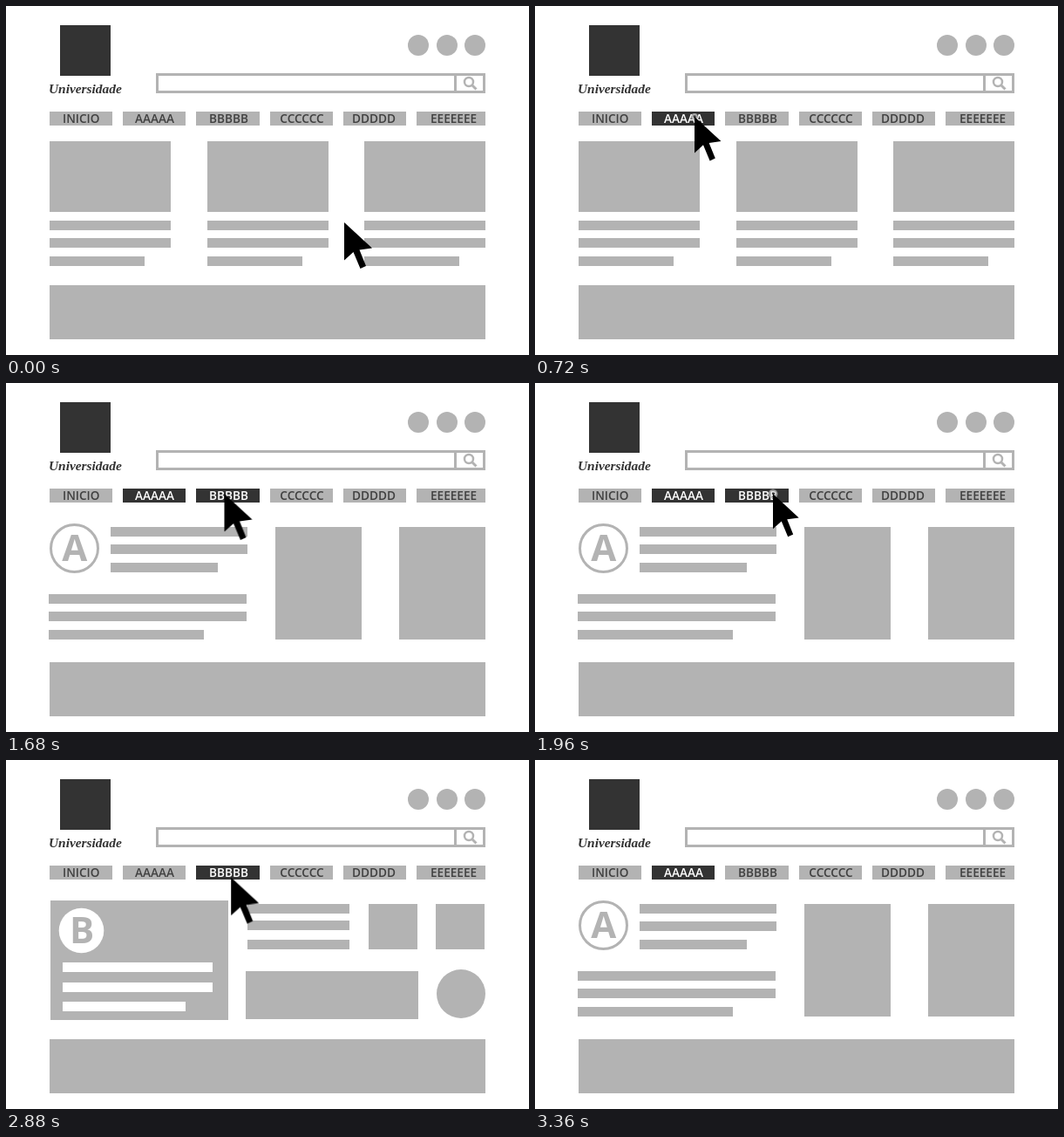
Recreate the animation shown at these times as an HTML page. Size 600x400 px, loop 3.4 s.

```html
<!DOCTYPE html>
<html lang="pt">
<head>
<meta charset="utf-8">
<title>Site navigation</title>
<style>
  html, body { margin: 0; width: 100%; height: 100%; overflow: hidden; background: #fff; }
  svg { display: block; width: 600px; height: 400px; }
  .gray { fill: #b3b3b3; }
  .line { fill: none; stroke: #b3b3b3; stroke-width: 3; }
  .dark { fill: #333; }
  .white { fill: #fff; }
  text { font: 600 13.6px "Open Sans", sans-serif; }
  .nav { fill: #404040; }
  .big { font-size: 42px; font-weight: 700; }
  .word { font: italic 700 15.4px "Liberation Serif", serif; }

  .home, .pageA, .pageB, .navA, .navB, .show { animation: 3400ms step-end infinite; }
  .home { animation-name: home; }
  .pageA { animation-name: pageA; }
  .pageB { animation-name: pageB; }
  .navA { animation-name: navA; }
  .navB { animation-name: navB; }
  .show { animation-name: show; }
  .cursor, .arrow, .ring { animation: 3400ms linear infinite; }
  .cursor { animation-name: move; }
  .arrow { animation-name: press; }
  .ring { animation-name: ring; fill: none; stroke: #b3b3b3; stroke-width: 2; vector-effect: non-scaling-stroke; }

  @keyframes home { 0% { opacity: 1 } 23.529%, 100% { opacity: 0 } }
  @keyframes pageA { 0% { opacity: 0 } 23.529% { opacity: 1 } 58.823% { opacity: 0 } 98.823%, 100% { opacity: 1 } }
  @keyframes pageB { 0% { opacity: 0 } 58.823% { opacity: 1 } 98.823%, 100% { opacity: 0 } }
  @keyframes navA { 0% { opacity: 0 } 15.294% { opacity: 1 } 58.823% { opacity: 0 } 98.823%, 100% { opacity: 1 } }
  @keyframes navB { 0% { opacity: 0 } 47.058% { opacity: 1 } 98.823%, 100% { opacity: 0 } }
  @keyframes show { 0% { opacity: 1 } 98.823%, 100% { opacity: 0 } }

  /* glide to A, rest, glide to B, rest, leave; one step per 40 ms */
  @keyframes move {
    0% { transform: translate(388px, 248px); animation-timing-function: steps(14) }
    16.47% { transform: translate(183px, 127px) }
    42.352% { transform: translate(183px, 127px); animation-timing-function: steps(8) }
    51.764% { transform: translate(273px, 127px) }
    83.529% { transform: translate(273px, 127px); animation-timing-function: steps(13) }
    98.823%, 100% { transform: translate(80.6px, 225.8px) }
  }
  /* both clicks: the arrow dips while a ring spreads from its tip */
  @keyframes press {
    0% { transform: scale(1) }
    18.823%, 54.117% { transform: scale(1); animation-timing-function: steps(5) }
    24.705%, 60% { transform: scale(.88); animation-timing-function: steps(5) }
    30.588%, 65.882%, 100% { transform: scale(1) }
  }
  @keyframes ring {
    0% { transform: scale(0); opacity: 0 }
    18.822%, 54.116% { transform: scale(0); opacity: 0 }
    18.823%, 54.117% { transform: scale(0); opacity: 1; animation-timing-function: steps(10) }
    30.587%, 65.881% { transform: scale(1); opacity: 1 }
    30.588%, 65.882%, 100% { transform: scale(0); opacity: 0 }
  }
</style>
</head>
<body>
<svg xmlns="http://www.w3.org/2000/svg" width="600" height="400">
  <rect class="dark" x="62" y="22" width="58" height="58"/>
  <text class="word dark" x="49" y="99.5">Universidade</text>

  <g class="gray">
    <circle cx="473" cy="45" r="12"/>
    <circle cx="506" cy="45" r="12"/>
    <circle cx="538" cy="45" r="12"/>
    <path d="M50 121h72v16h-72zM134 121h72v16h-72zM218 121h73v16h-73zM303 121h72v16h-72zM387 121h72v16h-72zM471 121h79v16h-79z"/>
    <rect x="50" y="320" width="500" height="62"/>
  </g>

  <g class="line">
    <path d="M173.5 78.5h375v20h-375zM515.5 78v21"/>
    <circle cx="531" cy="87" r="5" stroke-width="2.5"/>
    <path d="M534.5 90.5l5 5"/>
  </g>

  <g class="nav">
    <text x="65" y="133.9">INICIO</text>
    <text x="148" y="133.9">AAAAA</text>
    <text x="233" y="133.9">BBBBB</text>
    <text x="314.3" y="133.9">CCCCCC</text>
    <text x="397" y="133.9">DDDDD</text>
    <text x="487" y="133.9">EEEEEEE</text>
  </g>
  <g class="navA">
    <rect class="dark" x="134" y="121" width="72" height="16"/>
    <text class="white" x="148" y="133.9">AAAAA</text>
  </g>
  <g class="navB">
    <rect class="dark" x="218" y="121" width="73" height="16"/>
    <text class="white" x="233" y="133.9">BBBBB</text>
  </g>

  <g class="home gray">
    <path id="card" d="M50 155h139v81h-139zM50 246h139v11h-139zM50 266h139v11h-139zM50 287h109v11h-109z"/>
    <use href="#card" x="181"/>
    <use href="#card" x="361"/>
  </g>

  <g class="pageA gray">
    <circle class="line" cx="78.5" cy="189.5" r="27"/>
    <text class="big" x="64.3" y="204">A</text>
    <path d="M120 165h157v11h-157zM120 185h157v11h-157zM120 206h123v11h-123z"/>
    <path d="M49 242h227v11h-227zM49 262h227v11h-227zM49 283h178v11h-178z"/>
    <path d="M309 165h99v129h-99zM451 165h99v129h-99z"/>
  </g>

  <g class="pageB gray">
    <rect x="51" y="161" width="204" height="137"/>
    <circle class="white" cx="86.5" cy="195.5" r="25.8"/>
    <text class="big" x="73.1" y="209.5">B</text>
    <path class="white" d="M65 232h172v11h-172zM65 255h172v11h-172zM65 277h141v11h-141z"/>
    <path d="M277 165h117v11h-117zM277 184h117v11h-117zM277 206h117v11h-117z"/>
    <path d="M416 165h56v52h-56zM493 165h56v52h-56zM275 242h198v55h-198z"/>
    <circle cx="522" cy="268" r="28"/>
  </g>

  <g class="show">
    <g class="cursor">
      <circle class="ring" r="14"/>
      <path class="arrow" d="M0 0V43.5L10.5 34L18.5 53L25 50L17.5 31.5L32 29.5Z"/>
    </g>
  </g>
</svg>
</body>
</html>
```
